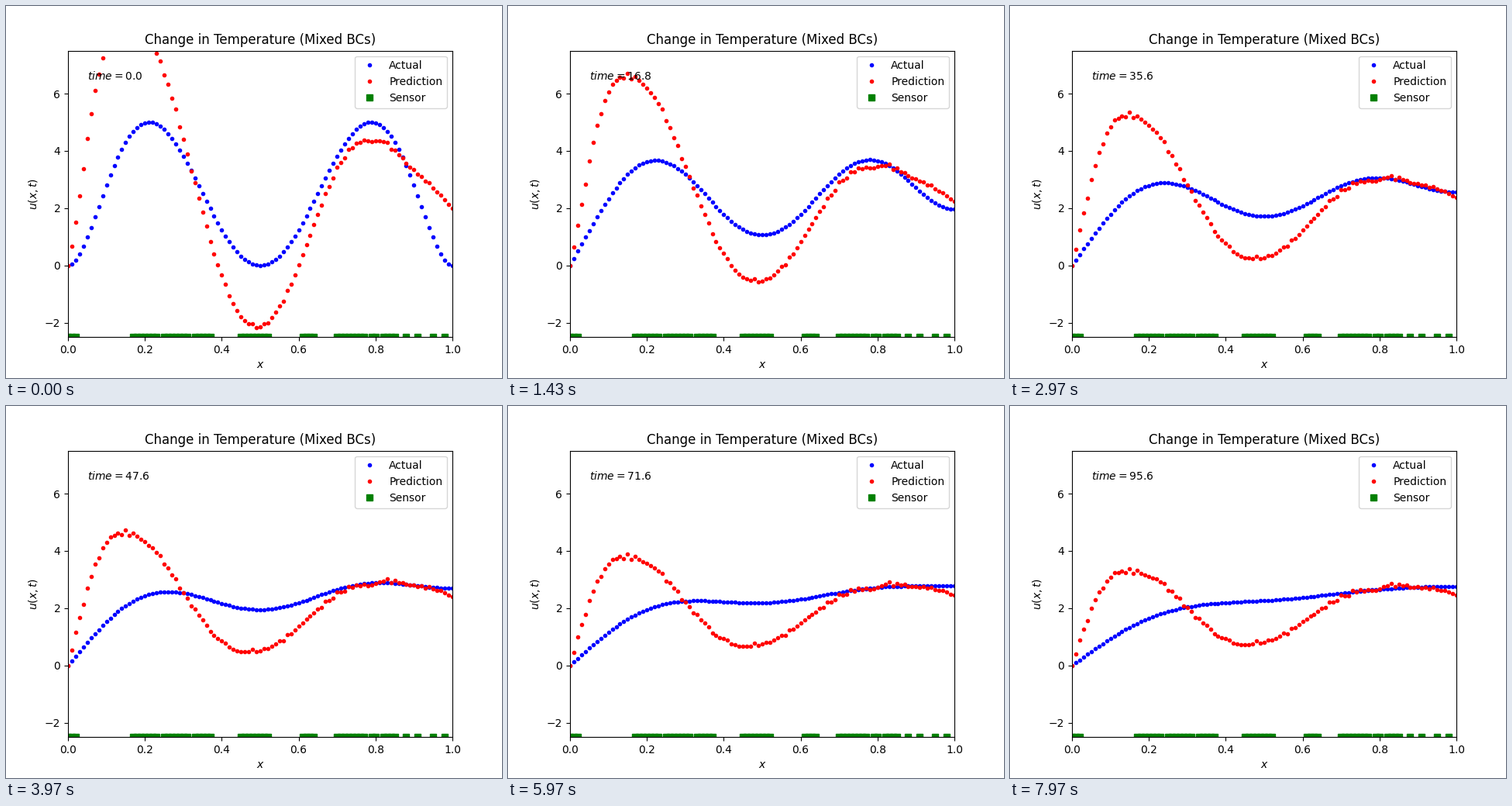
Recreate the animation shown at these times as a matplotlib script. Size 640 px wide and 480 px high, loop 8000 ms.

```python
import numpy as np
import matplotlib.pyplot as plt
from matplotlib.animation import FuncAnimation

FRAMES, LOOP_MS, DT = 240, 8000, 0.4
ALPHA = 3e-4
T_END = (FRAMES - 1) * DT
x = np.linspace(0, 1, 101)

# Actual: heat equation, u = 0 on the left and no flux on the right
k = (np.arange(80) + 0.5) * np.pi
s = np.linspace(0, 1, 4001)
start = 2160 * (s * (1 - s) * (s - 0.5)) ** 2
coef = 2 * np.sin(np.outer(k, s)) @ start / 4000
modes = np.sin(np.outer(x, k))


def actual(t):
    return modes @ (coef * np.exp(-ALPHA * k**2 * t))


def spline(xk, yk, xs):
    """Natural cubic spline through the columns of yk."""
    n = len(xk)
    line = np.column_stack([np.ones(n), xk])
    a = np.zeros((n + 2, n + 2))
    a[:n, :n] = np.abs(xk[:, None] - xk) ** 3
    a[:n, n:] = line
    a[n:, :n] = line.T
    w = np.linalg.solve(a, np.vstack([yk, np.zeros((2, yk.shape[1]))]))
    return np.abs(xs[:, None] - xk) ** 3 @ w[:n] + w[n] + np.outer(xs, w[n + 1])


# Prediction: late state, a wave that fades fast and a left bump that fades slowly
keys = np.array([  # x, late state, fast wave
    (0.00, 0.00, 0.00), (0.02, 0.83, -0.45), (0.05, 2.00, -0.10),
    (0.15, 3.30, 0.58), (0.25, 2.70, 1.28), (0.36, 1.24, -0.61),
    (0.48, 0.77, -2.96), (0.60, 1.50, -1.51), (0.70, 2.38, 0.98),
    (0.78, 2.68, 1.73), (0.88, 2.80, 0.83), (1.00, 2.47, -0.48)])
late, wave = spline(keys[:, 0], keys[:, 1:], x).T
z = x / 0.14
bump = 4.6 * z * np.exp((1 - z**2) / 2)
noise = np.random.default_rng(4).normal(0, 0.04, len(x)) * (x > 0)


def fade(t, rate):
    """Exponential decay from 1 at the start to 0 at T_END."""
    end = np.exp(-rate * T_END)
    return (np.exp(-rate * t) - end) / (1 - end)


def predicted(t):
    return late + noise + wave * fade(t, 0.045) + bump * fade(t, 0.02)


# Sensors: runs of neighbouring grid points
runs = [(0, 2), (17, 23), (25, 31), (33, 37), (45, 52), (61, 64), (70, 77),
        (79, 80), (82, 85), (88, 88), (91, 91), (95, 95), (98, 98)]
sensors = np.concatenate([x[a:b + 1] for a, b in runs])

fig, ax = plt.subplots(figsize=(6.4, 4.8), dpi=100)
blue, = ax.plot(x, actual(0), "b.", label="Actual")
red, = ax.plot(x, predicted(0), "r.", label="Prediction")
ax.plot(sensors, np.full(len(sensors), -2.5), "gs", label="Sensor")
clock = ax.text(0.05, 6.5, "")
ax.set(xlim=(0, 1), ylim=(-2.5, 7.5), xlabel="$x$", ylabel="$u(x,t)$",
       title="Change in Temperature (Mixed BCs)")
ax.legend(loc="upper right")


def update(i):
    t = i * DT
    blue.set_ydata(actual(t))
    red.set_ydata(predicted(t))
    clock.set_text(f"$time = {t:.1f}$")
    return blue, red, clock


anim = FuncAnimation(fig, update, frames=FRAMES, interval=LOOP_MS / FRAMES,
                     repeat=True, repeat_delay=0)
plt.show()
```
